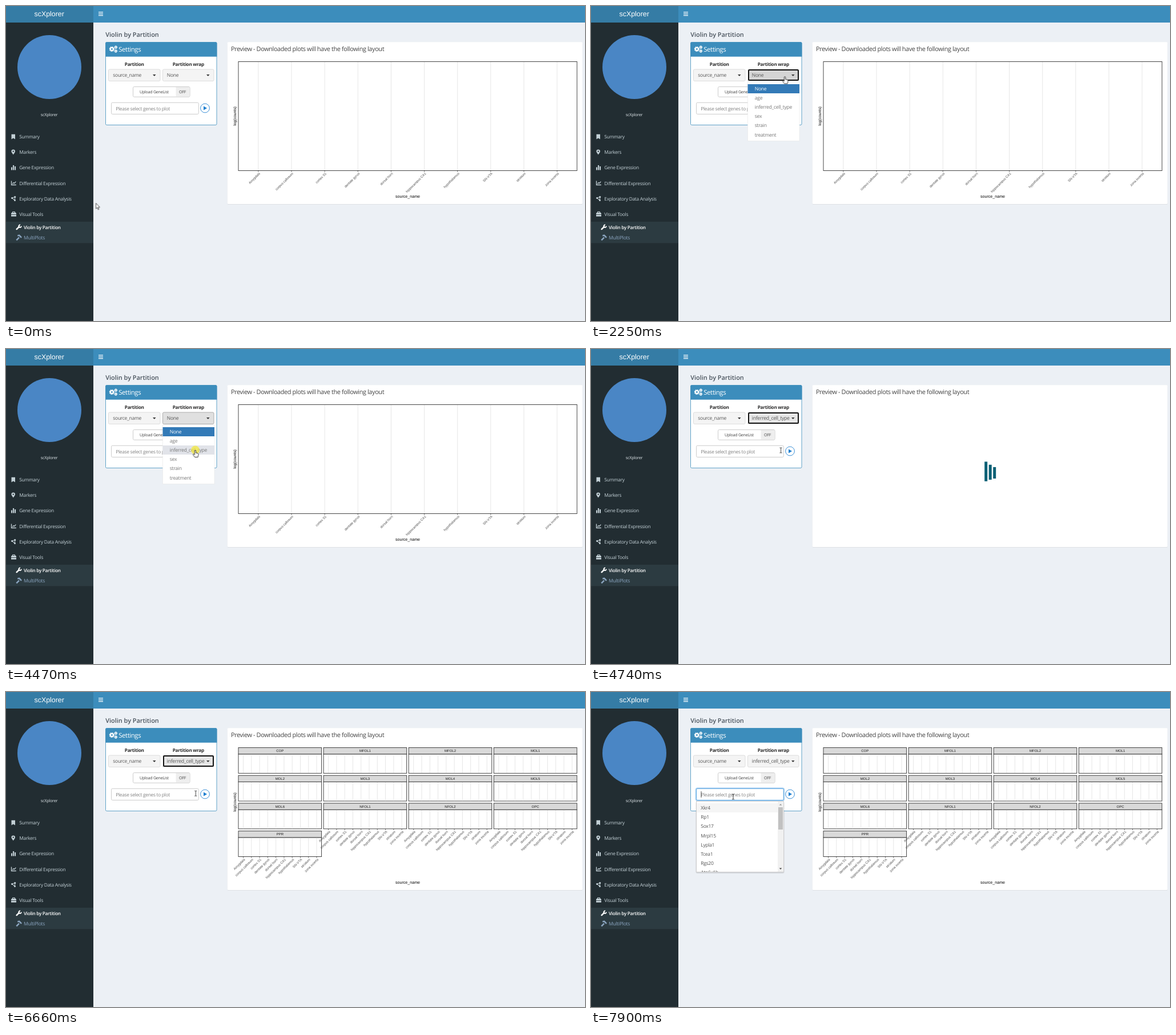
An HTML page that plays this animation: 1014 px wide and 552 px high, repeating every 8 s.

```html
<!DOCTYPE html>
<html lang="en">
<head>
<meta charset="utf-8">
<title>scXplorer</title>
<style>
html, body { margin: 0; width: 100%; height: 100%; overflow: hidden; background: #ecf0f5; }
svg { display: block; width: 100%; height: 100%; }
text { font-family: "Open Sans", "Noto Sans", sans-serif; letter-spacing: -.035em; text-rendering: geometricPrecision; }
.plot text { font-family: "Liberation Sans", Arial, sans-serif; letter-spacing: 0; }
.mid { text-anchor: middle; }
.menu { font-size: 8.35px; fill: #c3d0d6; }
.icons { fill: #c3d0d6; }
.field { font-size: 8.5px; fill: #555; }

/* one 8 s clock; hard switches use step-end */
.t { animation: 8s step-end infinite; }
#pointer { animation: move 8s linear infinite; }
@keyframes move {
  0%, 7.8% { transform: translate(157.5px, 345.5px); animation-timing-function: cubic-bezier(.45, .05, .7, .8); }
  15.125% { transform: translate(307px, 191.5px); }
  17.75% { transform: translate(328px, 152px); animation-timing-function: ease-out; }
  23.875%, 39.3% { transform: translate(339.5px, 123.5px); animation-timing-function: ease-in-out; }
  49.25%, 82.9% { transform: translate(331.5px, 177px); animation-timing-function: ease-in; }
  88% { transform: translate(302px, 203px); }
  92.875% { transform: translate(252px, 205px); }
  94.625%, 100% { transform: translate(248px, 183px); }
}
#arrow { animation-name: arrow; }
@keyframes arrow { 0%, 16.6%, 85.6% { opacity: 1 } 15.5%, 20.4%, 93.8%, 100% { opacity: 0 } }
#beam { animation-name: beam; }
@keyframes beam { 0%, 16.6%, 20.4%, 85.6% { opacity: 0 } 15.5%, 57.5%, 93.8%, 100% { opacity: 1 } }
#hand { animation-name: hand; }
@keyframes hand { 0%, 57.5%, 100% { opacity: 0 } 20.4% { opacity: 1 } }
#click { animation-name: click; }
@keyframes click { 0%, 28.125%, 57.5%, 98.75%, 100% { opacity: 0 } 26.375%, 55.875%, 96.25% { opacity: 1 } }
#wrap { animation-name: wrap; }
@keyframes wrap {
  0% { fill: #f4f4f4; stroke: #ddd }
  20.4% { fill: #e7e7e7; stroke: #adadad }
  26.375% { fill: #d4d4d4; stroke: #8c8c8c }
  55.875% { fill: #e0e0e0; stroke: #adadad }
  57.5% { fill: #e6e6e6; stroke: #8c8c8c }
  96.25%, 100% { fill: #f4f4f4; stroke: #ddd }
}
#ring { animation-name: ring; }
@keyframes ring { 0%, 55.875%, 96.25%, 100% { opacity: 0 } 26.375%, 57.5% { opacity: 1 } }
#before { animation-name: before; }
@keyframes before { 0% { opacity: 1 } 57.5%, 100% { opacity: 0 } }
#after { animation-name: after; }
@keyframes after { 0% { opacity: 0 } 57.5%, 100% { opacity: 1 } }
#options { animation-name: options; }
@keyframes options { 0%, 57.5%, 100% { opacity: 0 } 28.125% { opacity: 1 } }
#hover { animation-name: hover; }
@keyframes hover {
  0% { opacity: 0; y: 153px }
  45% { opacity: 1; y: 153px }
  47.2%, 100% { opacity: 1; y: 169px }
}
#single { animation-name: single; }
@keyframes single { 0% { opacity: 1 } 59.25%, 100% { opacity: 0 } }
#spinner { animation-name: spinner; }
@keyframes spinner { 0%, 70.625%, 100% { opacity: 0 } 59.25% { opacity: 1 } }
#facets { animation-name: facets; }
@keyframes facets { 0% { opacity: 0 } 70.625%, 100% { opacity: 1 } }
#genes { animation-name: genes; }
@keyframes genes { 0% { opacity: 0 } 96.25%, 100% { opacity: 1 } }
#spinner rect { fill: #0b6075; animation: bar 1s ease-in-out infinite; }
@keyframes bar {
  0%, 80%, 100% { y: 207px; height: 20px }
  40% { y: 197px; height: 35px }
}
</style>
</head>
<body>
<svg viewBox="0 0 1014 552" preserveAspectRatio="none">
  <rect width="1014" height="552" fill="#ecf0f5"/>
  <rect x="153" width="861" height="29" fill="#3c8dbc"/>
  <rect y="29" width="153" height="523" fill="#222d32"/>
  <rect width="153" height="29" fill="#357ca5"/>
  <text class="mid" x="75.7" y="18" fill="#fff" style="font:12.4px 'Liberation Sans',Arial,sans-serif;letter-spacing:0">scXplorer</text>
  <path d="M162 10.9h8M162 13.8h8M162 16.7h8" stroke="#fff" stroke-width="1.3"/>

  <circle cx="76" cy="107" r="56" fill="#4a86c5"/>
  <text class="mid" x="75.5" y="193" font-size="7.3" fill="#dde4e8">scXplorer</text>

  <rect y="378" width="153" height="37.5" fill="#2c3b41"/>
  <g class="menu">
    <text x="23.3" y="232">Summary</text>
    <text x="23.3" y="259.2">Markers</text>
    <text x="23.3" y="286.3">Gene Expression</text>
    <text x="23.3" y="313.5">Differential Expression</text>
    <text x="23.3" y="340.7">Exploratory Data Analysis</text>
    <text x="23.3" y="368">Visual Tools</text>
    <text x="31" y="390.7" style="font-size:8.2px;font-weight:600;fill:#fff">Violin by Partition</text>
    <text x="31" y="409.3" style="font-size:8.6px;fill:#8aa4bf">MultiPlots</text>
  </g>
  <g class="icons">
    <path d="M9.5 224.8h6.5v8.6l-3.2-2-3.3 2z"/>
    <path fill-rule="evenodd" d="M12.7 260.5Q9.4 256.4 9.4 254.8a3.3 3.3 0 0 1 6.6 0Q16 256.4 12.7 260.5zM12.7 253.4a1.2 1.2 0 1 0 .1 0z"/>
    <path d="M9 282.5h2.1v5H9zM12 279h2.1v8.5H12zM15 281h2.1v6.5H15z"/>
    <path d="M9.5 306.5v7h8.3M11.3 311.5l2-2 1.5 1.2 2.5-3" fill="none" stroke="#c3d0d6" stroke-width="1.3"/>
    <path d="M10.5 336.5l5-2v6zM10.5 336.5l5 4" fill="none" stroke="#c3d0d6"/>
    <circle cx="10.6" cy="336.5" r="1.6"/><circle cx="15.7" cy="334.7" r="1.6"/><circle cx="15.5" cy="340.4" r="1.5"/>
    <path d="M9 363.5l1-1.5h7l1 1.5v1.6H9zM9 365.8h9v3H9z"/>
    <path d="M11.5 362v-1.5h4v1.5" fill="none" stroke="#c3d0d6"/>
    <path d="M18.7 391.2l4.3-4.3" stroke="#fff" stroke-width="2.6" stroke-linecap="round"/>
    <path d="M25 383.6a2.2 2.2 0 1 0 1.8 2.2" fill="none" stroke="#fff" stroke-width="2"/>
    <path d="M18.3 410.3l4.7-4.7M20.3 402.5l2.9-.6 3.9 4" fill="none" stroke="#8aa4bf" stroke-width="2.5"/>
  </g>

  <text x="174.3" y="54.2" font-size="10.9" font-weight="600" fill="#48525c" style="letter-spacing:0">Violin by Partition</text>

  <rect x="174.5" y="63.5" width="194.5" height="145" rx="2" fill="#fff" stroke="#3c8dbc" stroke-width=".8"/>
  <path d="M174.2 88.8V65q0-1.7 2-1.7h191.2q2 0 2 1.7v23.8z" fill="#3c8dbc"/>
  <g fill="none" stroke="#fff">
    <circle cx="185.4" cy="75.5" r="2.6" stroke-width="2.4"/>
    <circle cx="185.4" cy="75.5" r="4" stroke-width="1.3" stroke-dasharray="1.6 1.54"/>
    <circle cx="192.3" cy="72.3" r="1.5" stroke-width="1.4"/>
    <circle cx="192.3" cy="72.3" r="2.5" stroke-dasharray="1.1 .86"/>
    <circle cx="192.3" cy="79" r="1.5" stroke-width="1.4"/>
    <circle cx="192.3" cy="79" r="2.5" stroke-dasharray="1.1 .86"/>
  </g>
  <text x="197.2" y="80" font-size="11.4" fill="#fff">Settings</text>
  <g class="mid" font-size="8.2" font-weight="700" fill="#2b2b2b">
    <text x="224.7" y="104.5">Partition</text>
    <text x="319.3" y="104.5">Partition wrap</text>
  </g>

  <rect x="179.5" y="111" width="90.5" height="20.5" rx="2" fill="#f4f4f4" stroke="#ddd"/>
  <rect id="wrap" class="t" x="274.5" y="111" width="89.5" height="20.5" rx="2"/>
  <g id="ring" class="t" fill="none">
    <rect x="274.5" y="110.5" width="90" height="21" rx="2.5" stroke="#fff"/>
    <rect x="276" y="112" width="87" height="18" rx="1.5" stroke="#111" stroke-width="2"/>
  </g>
  <g class="field">
    <text x="187.3" y="124.3">source_name</text>
    <text id="before" class="t" x="281.8" y="124.3">None</text>
    <text id="after" class="t" x="281.8" y="124.3" font-size="8.7">inferred_cell_type</text>
  </g>
  <path d="M257 120h5.6l-2.8 3zM351 120h5.6l-2.8 3z" fill="#333"/>

  <rect x="222.5" y="141.5" width="99.5" height="17.8" rx="2" fill="#fff" stroke="#ccc"/>
  <path d="M297.5 142h22.5q1.5 0 1.5 1.5v13.8q0 1.5-1.5 1.5h-22.5z" fill="#eee"/>
  <g class="mid" font-size="7.1" fill="#444">
    <text x="259.4" y="153">Upload GeneList</text>
    <text x="309" y="153">OFF</text>
  </g>

  <rect x="184.5" y="169.3" width="152.8" height="20.2" rx="2" fill="#fff" stroke="#ccc"/>
  <text x="192.3" y="182.7" font-size="8.35" fill="#808080">Please select genes to plot</text>
  <circle cx="348.5" cy="179" r="7.9" fill="#fff" stroke="#3a8fd6"/>
  <path d="M346 175.5l6 3.5-6 3.5z" fill="#1f7fd0"/>

  <rect x="387.7" y="64" width="622" height="284" rx="2" opacity=".1"/>
  <rect x="387.7" y="63.2" width="622" height="284" rx="2" fill="#fff"/>
  <text x="394" y="78.6" font-size="10.9" fill="#444">Preview - Downloaded plots will have the following layout</text>

  <g id="single" class="t plot"></g>
  <g id="facets" class="t plot"></g>
  <g id="spinner" class="t">
    <rect x="689.2" width="5" style="animation-delay:-.6s"/>
    <rect x="696.7" width="5" style="animation-delay:-.44s"/>
    <rect x="704.2" width="5" style="animation-delay:-.28s"/>
  </g>

  <g id="options" class="t">
    <rect x="274.5" y="133" width="90.5" height="103.3" fill="#fff" stroke="#e6e6e6" stroke-width=".6"/>
    <rect x="274.5" y="137" width="90.5" height="16" fill="#337ab7"/>
    <rect id="hover" class="t" x="274.5" y="153" width="90.5" height="16" fill="#e1e3e9"/>
  </g>

  <g id="genes" class="t">
    <rect x="183.5" y="168.3" width="154.8" height="22.2" rx="3" fill="none" stroke="#a9d2f3" stroke-width="1.5"/>
    <rect x="184.5" y="169.3" width="152.8" height="20.2" rx="2" fill="none" stroke="#5aa7e4"/>
    <path d="M193 174v11" stroke="#222" stroke-width=".8"/>
    <rect x="183.5" y="192" width="155" height="126" rx="3" opacity=".1"/>
    <rect x="184.5" y="191.5" width="152.8" height="124" fill="#fff" stroke="#ccc"/>
    <rect x="185" y="195" width="142" height="16" fill="#f5f5f5"/>
    <rect x="327" y="192" width="10" height="123" fill="#f1f1f1"/>
    <rect x="328" y="202" width="8" height="39" fill="#c1c1c1"/>
    <path d="M329.7 198.5h4.6l-2.3-2.6z" fill="#999"/>
    <path d="M329.7 308.5h4.6l-2.3 2.6z" fill="#444"/>
    <clipPath id="listClip"><rect x="185" y="192" width="142" height="123"/></clipPath>
    <g id="geneNames" clip-path="url(#listClip)"></g>
  </g>

  <g id="pointer">
    <circle id="click" class="t" r="7.5" fill="#f4e93c" fill-opacity=".75"/>
    <path id="arrow" class="t" d="M0 0V9.8L2.2 7.7 3.8 11.3 5.3 10.7 3.8 7.2H6.8Z" fill="#fff" stroke="#222" stroke-width=".8"/>
    <path id="hand" class="t" d="M-1.1 1Q0-.7 1.1 1V5L4.4 5.8Q5.8 6.2 5.5 8.2L4.6 12.5H-.9L-3.8 8.6Q-4.2 6.8-2.7 7L-1.1 8.3Z" fill="#fff" stroke="#222" stroke-width=".9"/>
    <path id="beam" class="t" d="M-1-4H.5L1-3.5 1.5-4H3M1-3.5V4.5M-1 5H.5L1 4.5 1.5 5H3" fill="none" stroke="#222" stroke-width=".9"/>
  </g>
</svg>
<script>
const regions = ['Amygdala', 'corpus callosum', 'cortex S1', 'dentate gyrus', 'dorsal horn',
  'hippocampus CA1', 'hypothalamus', 'SN-VTA', 'striatum', 'zona incerta'];
const cells = ['COP', 'MFOL1', 'MFOL2', 'MOL1', 'MOL2', 'MOL3', 'MOL4', 'MOL5', 'MOL6',
  'NFOL1', 'NFOL2', 'OPC', 'PPR'];
const $ = id => document.getElementById(id);
const text = (x, y, size, fill, str, extra = '') =>
  `<text x="${x}" y="${y}" font-size="${size}" fill="${fill}" ${extra}>${str}</text>`;
const box = (x, y, w, h, fill) =>
  `<rect x="${x}" y="${y}" width="${w}" height="${h}" fill="${fill}" stroke="#333" stroke-width=".9"/>`;

// Ten categories with 0.6 of a step as margin on either side
const tickX = (x, w, i) => x + w / 10.2 * (i + .6);
const panel = (x, y, w, h) => box(x, y, w, h, '#fff') + regions.map((_, i) =>
  `<path d="M${tickX(x, w, i)} ${y + .5}v${h - 1}" stroke="#e6e6e6"/>`).join('');
const axis = (x, y, w) => regions.map((name, i) => {
  const tx = tickX(x, w, i);
  return `<path d="M${tx} ${y}v2" stroke="#333" stroke-width=".8"/>` +
    text(0, 0, 5.8, '#4d4d4d', name, `text-anchor="end" transform="translate(${tx + 3.5} ${y + 5.5}) rotate(-45)"`);
}).join('');
const titles = text(703.5, 336, 7.1, '#000', 'source_name', 'class="mid"') +
  text(0, 0, 6.8, '#000', 'log(counts)', 'class="mid" transform="translate(403 193) rotate(-90)"');

$('single').innerHTML = titles + panel(407, 97.5, 593, 191) + axis(407, 288.5, 593);

const colX = c => 407 + c * 149.1, panelW = 145.6;
$('facets').innerHTML = titles + cells.map((name, i) => {
  const x = colX(i % 4), y = 97.5 + Math.floor(i / 4) * 48.7;
  return panel(x, y + 11.3, panelW, 33.6) + box(x, y, panelW, 11.3, '#d9d9d9') +
    text(x + panelW / 2, y + 7.8, 6, '#1a1a1a', name, 'class="mid"');
}).join('') + [0, 1, 2, 3].map(c => axis(colX(c), c ? 239.8 : 288.5, panelW)).join('');

$('options').innerHTML += ['None', 'age', 'inferred_cell_type', 'sex', 'strain', 'treatment']
  .map((name, i) => text(286.8, 148 + i * 16.1, 8.6, i ? '#777' : '#fff', name)).join('');
$('geneNames').innerHTML = ['Xkr4', 'Rp1', 'Sox17', 'Mrpl15', 'Lypla1', 'Tcea1', 'Rgs20', 'Atp6v1h']
  .map((name, i) => text(192.3, 206.2 + i * 16.1, 8.5, '#555', name)).join('');
</script>
</body>
</html>
```
